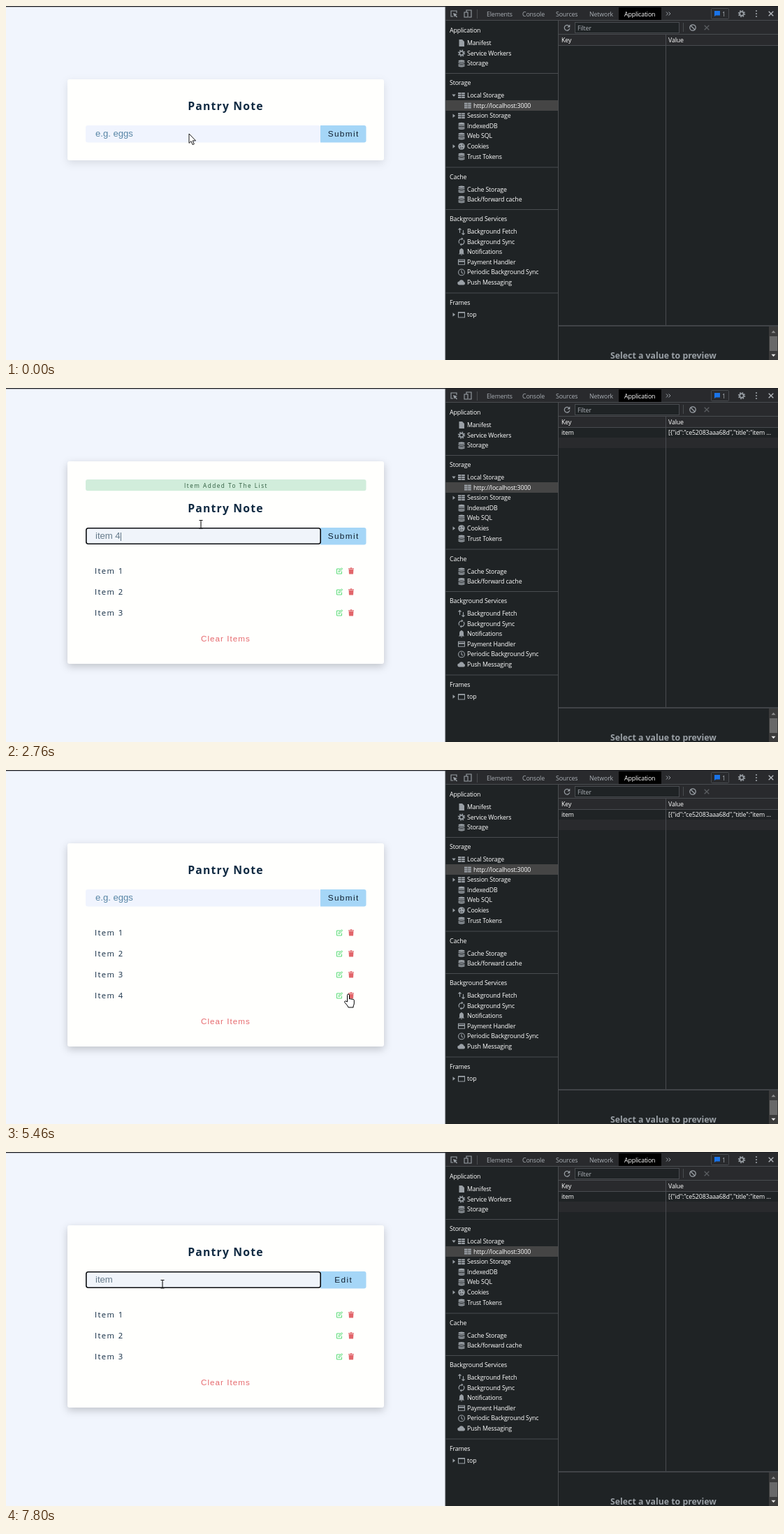
An HTML page for the animation above (8000 ms loop, 1105 by 507 pixels).

```html
<!DOCTYPE html>
<html lang="en">
<head>
<meta charset="utf-8">
<title>Shopping list with local storage</title>
<style>
html, body { margin: 0; width: 100%; height: 100%; overflow: hidden; background: #f1f5fd; }
svg { display: block; width: 100vw; height: 100vh; }
text { white-space: pre; font-family: "Open Sans", "Noto Sans", sans-serif; }
.ui { font-size: 8.8px; letter-spacing: -.14px; fill: #fff; }
.tab { fill: #a9aeb4; }
.preview { font-size: 12.3px; font-weight: 700; fill: #9aa0a6; }
.card { filter: drop-shadow(0 4px 6px rgba(0,0,0,.1)); }
.card.filled { filter: drop-shadow(0 4px 6px rgba(0,0,0,.2)); }
.title { font-size: 15.8px; font-weight: 700; letter-spacing: 1.17px; fill: #102a42; text-anchor: middle; }
.alert { font-size: 8.2px; letter-spacing: 1.5px; text-anchor: middle; }
.item { font-size: 11.2px; letter-spacing: 1.4px; }
.field, .button, .clear { font-family: "Liberation Sans", Arial, sans-serif; }
.field { font-size: 13.1px; }
.button { font-size: 11.8px; letter-spacing: 1.4px; text-anchor: middle; }
.clear { font-size: 11.7px; letter-spacing: 1.02px; fill: #e66a6e; text-anchor: middle; }
</style>
</head>
<body>
<svg viewBox="0 0 1105 507" preserveAspectRatio="none">
  <g id="tools"></g>
  <g id="storage"></g>
  <g id="app"></g>
</svg>
<script>
const LOOP = 8000, GRAY = '#9aa0a6', LINE = '#494c50', BAR = '#292a2d', DARK = '#1f2325';

const rect = (x, y, w, h, fill, extra = '') =>
  `<rect x="${x}" y="${y}" width="${w}" height="${h}" fill="${fill}" ${extra}/>`;
const text = (x, y, s, cls, extra = '') => `<text x="${x}" y="${y}" class="${cls}" ${extra}>${s}</text>`;
const solid = (x, y, d, fill = GRAY, extra = '') =>
  `<path transform="translate(${x} ${y})" d="${d}" fill="${fill}" ${extra}/>`;
const stroke = (x, y, d, color = GRAY, width = 1.1) =>
  solid(x, y, d, 'none', `stroke="${color}" stroke-width="${width}"`);
const ring = (x, y, r, width = 1.1, extra = '') =>
  `<circle cx="${x}" cy="${y}" r="${r}" fill="none" stroke="${GRAY}" stroke-width="${width}" ${extra}/>`;

// ---------- developer tools ----------
const gear = (x, y) => ring(x, y, 2.8, 1.8) + ring(x, y, 4.4, 1.5, 'stroke-dasharray="1.75 1.7"');
const icons = {
  file: (x, y) => solid(x, y, 'M-3.5-5H1L4-2V5h-7.5z'),
  gear,
  db: (x, y) => [-3.4, -.7, 2, 4].map((dy, i) =>
    solid(x, y + dy, i ? 'M-4.5-1.3q4.5 2 9 0v1.5q-4.5 2-9 0z' : 'M-4.5 0a4.5 1.6 0 0 1 9 0 4.5 1.6 0 0 1-9 0')).join(''),
  grid: (x, y) => [0, 1, 2, 3, 4, 5].map(i =>
    rect(x - 5 + i % 2 * 5.2, y - 4 + (i >> 1) * 2.9, 4.6, 2.2, GRAY)).join(''),
  cookie: (x, y) => `<circle cx="${x}" cy="${y}" r="4.8" fill="${GRAY}"/>` +
    [[-2, -1], [1, 2], [2, -2], [-1.5, 2.3]].map(([a, b]) => rect(x + a - .6, y + b - .6, 1.3, 1.3, DARK)).join(''),
  swap: (x, y) => stroke(x, y, 'M-2.5 2V-4.5M-4.5-2.5l2-2 2 2M2.5-2V4.5M.5 2.5l2 2 2-2'),
  sync: (x, y) => stroke(x, y, 'M-3 2.6A4 4 0 0 1 0-4M3-2.6A4 4 0 0 1 0 4', GRAY, 1.2) +
    solid(x, y, 'M0-6l2.5 2L0-2zM0 6l-2.5-2L0 2z'),
  bell: (x, y) => solid(x, y, 'M-4.2 3.2L-3 2V-1q0-3 2.3-3.4V-5.2H.7v.8Q3-4 3-1v3l1.2 1.2zM-1.2 4h2.4L0 5.3z'),
  card: (x, y) => stroke(x, y, 'M-4.5-3.5h9v7h-9z') + rect(x - 4.5, y - 2, 9, 2, GRAY),
  clock: (x, y) => ring(x, y, 4.4) + stroke(x, y, 'M0-2.8V.3L2 1.6'),
  cloud: (x, y) => solid(x, y, 'M-3 3.5a2.5 2.5 0 0 1-.4-5A3.6 3.6 0 0 1 3.4-1 2.3 2.3 0 0 1 3 3.5z'),
  frame: (x, y) => stroke(x, y, 'M-4.5-3.5h9v7.5h-9z') + rect(x - 4.5, y - 4, 9, 1.8, GRAY)
};
const PITCH = 14.6;
const sections = [
  ['Application', 35, 53, ['file Manifest', 'gear Service Workers', 'db Storage']],
  ['Storage', 110, 128, ['grid Local Storage', 'grid http://localhost:3000', 'grid Session Storage', 'db IndexedDB',
    'db Web SQL', 'cookie Cookies', 'db Trust Tokens']],
  ['Cache', 245, 262.5, ['db Cache Storage', 'db Back/forward cache']],
  ['Background Services', 305, 323, ['swap Background Fetch', 'sync Background Sync', 'bell Notifications',
    'card Payment Handler', 'clock Periodic Background Sync', 'cloud Push Messaging']],
  ['Frames', 425, 442, ['frame top']]
];

function sidebar() {
  let out = rect(629, 135, 161, 15, '#454545');
  for (const [heading, headY, firstY, entries] of sections) {
    out += text(635, headY + 3, heading, 'ui');
    entries.forEach((entry, i) => {
      const [kind, ...words] = entry.split(' '), label = words.join(' ');
      const y = firstY + i * PITCH, indent = label.startsWith('http') ? 9 : 0;
      out += icons[kind](652 + indent, y) + text(660 + indent, y + 3, label, 'ui');
      if (label === 'Local Storage') out += solid(641, y, 'M-2.7-1.5h5.4L0 2z');
      if (['Session Storage', 'Cookies', 'top'].includes(label)) out += solid(641, y, 'M-1.5-2.7v5.4L2 0z');
    });
  }
  return out + [96, 230.5, 291, 410.5].map(y => rect(629, y, 161, 1, LINE)).join('');
}

function toolbar() {
  const tabs = { Elements: 688, Console: 739, Sources: 787, Network: 835 };
  return rect(629, 1, 476, 19.5, BAR) + rect(629, 20, 476, 1, LINE) +
    stroke(641, 11, 'M4-1V-4h-8v8h3') + solid(641, 11, 'M-1-1l6 2-2.3 1L5 4.5 4 5.5 1.7 3 .8 5z') +
    stroke(661, 11, 'M-2-2V-5H5V5H1M-5-2H0V5h-5z') + rect(674, 5, 1, 13, LINE) +
    Object.entries(tabs).map(([name, x]) => text(x, 14.5, name, 'ui tab')).join('') +
    rect(877, 2, 61, 18, '#000') + text(885, 14.5, 'Application', 'ui') +
    stroke(948, 11, 'M-3-2.5L-.5 0-3 2.5M.5-2.5L3 0 .5 2.5', GRAY, 1) +
    rect(1009.5, 3.5, 25, 15, 'none', `stroke="${LINE}" rx="1"`) +
    solid(1018, 11, 'M-4-4h8v6.5h-6L-4 4z', '#1a73e8') + text(1025, 14.5, '1', 'ui tab') +
    gear(1053, 11) + [-4, 0, 4].map(d => `<circle cx="1074" cy="${11 + d}" r="1.1" fill="${GRAY}"/>`).join('') +
    stroke(1095, 11, 'M-3.3-3.3l6.6 6.6M3.3-3.3l-6.6 6.6', '#b4b8bd', 1.3);
}

function storagePanel() {
  return rect(791, 21, 314, 36, BAR) + rect(791, 40, 314, 1, LINE) + rect(791, 56, 314, 1, LINE) +
    rect(790, 21, 1, 486, LINE) +
    stroke(803, 31, 'M3-2.2A3.8 3.8 0 1 0 3.8 1', GRAY, 1.2) + solid(803, 31, 'M4.3-4.5V-.6H.4z') +
    rect(814.5, 23.5, 149, 15, DARK, `stroke="${LINE}"`) + text(818, 34.5, 'Filter', 'ui tab') +
    rect(969, 24, 1, 13, LINE) + ring(983, 31, 4.2, 1.3) + stroke(983, 31, 'M-3-3l6 6', GRAY, 1.3) +
    stroke(1003, 31, 'M-3.3-3.3l6.6 6.6M3.3-3.3l-6.6 6.6', '#5b5e62', 1.3) +
    text(795, 51.7, 'Key', 'ui') + text(948, 51.7, 'Value', 'ui') + rect(791, 457, 314, 2, '#404347') +
    text(865, 505, 'Select a value to preview', 'preview') +
    rect(1092, 459, 13, 48, '#3b3b3b') + rect(1093, 473, 11, 21, '#696969') +
    solid(1098.5, 466.5, 'M-3 1.7h6L0-1.7z', '#8b8b8b') + solid(1098.5, 500.5, 'M-3-1.7h6L0 1.7z', '#e6e6e6');
}

tools.innerHTML = rect(0, 0, 1105, 1.3, '#1b1c20') + rect(629, 1, 476, 506, DARK) +
  sidebar() + toolbar() + storagePanel() + rect(628.5, 1, 1, 506, LINE);

const storedRow = rect(791, 71, 314, 15, BAR) + text(795, 67, 'item', 'ui') +
  text(948, 67, '[{"id":"ce52083aaa68d","title":"item ...', 'ui');
const columnLine = rect(944, 41, 1, 416, LINE);

// ---------- timeline ----------
const itemCount = [[0, 0], [1330, 1], [2100, 2], [2430, 3], [2860, 4], [5570, 3]];
const notice = [[0, ''], [1330, 'Item Added To The List'], [4360, ''], [5570, 'Item Removed'], [7060, '']];
const focused = [[0, false], [200, true], [3200, false], [7480, true]];
// A trailing bar marks a visible caret.
const typed = [
  [0, ''], [460, 'i|'], [560, 'it|'], [640, 'ite|'], [740, 'item|'], [900, 'item |'], [1060, 'item 1|'], [1330, ''],
  [1460, 'i|'], [1530, 'it|'], [1590, 'ite|'], [1660, 'item|'], [1750, 'item |'], [1900, 'item 2|'], [2100, ''],
  [2200, 'i|'], [2250, 'it|'], [2300, 'item|'], [2360, 'item 3|'], [2430, ''],
  [2500, 'i|'], [2560, 'it|'], [2620, 'item|'], [2690, 'item |'], [2760, 'item 4|'], [2860, ''],
  [7200, 'item 3'], [7760, 'item |'], [7800, 'item ']
];
const pointer = [
  [60, 262, 183, 'arrow'], [100, 268, 187, 'beam'], [230, 279, 195, 'beam'], [3030, 279, 195, 'beam'],
  [3200, 300, 182, 'beam'], [3350, 320, 150, 'arrow'], [3500, 323, 133, 'arrow'], [3660, 323, 133, 'arrow'],
  [3830, 382, 157, 'arrow'], [4060, 382, 157, 'arrow'], [4200, 455, 202, 'hand'], [4360, 470, 215, 'arrow'],
  [4460, 476, 256, 'arrow'], [4600, 474, 278, 'arrow'], [4860, 476, 318, 'arrow'], [4900, 476, 318, 'arrow'],
  [5130, 482, 418, 'arrow'], [5300, 488, 400, 'arrow'], [5440, 490, 325, 'hand'], [5460, 490, 321, 'hand'],
  [5730, 490, 321, 'hand'], [5860, 488, 318, 'arrow'], [6000, 488, 318, 'arrow'], [6150, 485, 290, 'hand'],
  [6260, 484, 297, 'hand'], [6330, 482, 318, 'hand'], [6460, 480, 321, 'hand'], [6630, 480, 321, 'hand'],
  [6760, 478, 321, 'hand'], [7060, 478, 321, 'arrow'], [7150, 477, 293, 'hand'], [7200, 477, 292, 'arrow'],
  [7400, 280, 200, 'arrow'], [7430, 260, 194, 'beam'], [7560, 224, 189, 'beam'], [8000, 224, 189, 'beam']
];
const buttonHover = [[4200, 4370]];
const rowHover = [
  [[4370, 4440], [7270, 7310]], [[4440, 4600], [6090, 6300], [7230, 7270]],
  [[4600, 4760], [5570, 6090], [6300, 7060], [7110, 7230]], [[4760, 4960], [5455, 5570]]
];

const current = (steps, t) => steps.filter(s => s[0] <= t).pop()[1];
const clamp = v => Math.max(0, Math.min(1, v));
const hoverLevel = (spans, t) =>
  clamp(spans.reduce((sum, [a, b]) => sum + clamp((t - a) / 300) - clamp((t - b) / 300), 0));
const mix = (a, b, k) => `rgb(${a.map((v, i) => Math.round(v + (b[i] - v) * k))})`;

// ---------- list app ----------
const cursors = {
  arrow: (x, y) => solid(x, y, 'M0 0V13.4l3-2.8 2.1 5 2.2-.9-2.1-4.8H9.5z', '#fff', 'stroke="#000" stroke-width=".9"'),
  beam: (x, y) => stroke(x, y, 'M-2.5-5.5H-.5L0-5 .5-5.5h2M0-5V5.5M-2.5 6H-.5L0 5.5 .5 6h2', '#111', 1.1),
  hand: (x, y) => solid(x, y,
    'M-1.5 11V1.5a1.5 1.5 0 0 1 3 0V7q1.3-1 2.3.3 1.4-1 2.3.4 1.8-.8 2.2 1V13q0 2-1.2 4v2H0q-.6-2-2.5-4L-5.5 11.5q0-2 2-1.5z',
    '#fff', 'stroke="#000" stroke-width="1"')
};

function cursor(t) {
  const next = pointer.findIndex(p => p[0] > t);
  const b = pointer[next], a = pointer[Math.max(0, next - 1)];
  const k = a === b ? 0 : (t - a[0]) / (b[0] - a[0]);
  return cursors[a[3]](a[1] + (b[1] - a[1]) * k, a[2] + (b[2] - a[2]) * k);
}

function alertBar(message) {
  const added = message.includes('Added');
  return rect(114, 131, 401.5, 16.3, added ? '#d1eddb' : '#f8d7dc', 'rx="3"') +
    text(315, 142.5, message, 'alert', `fill="${added ? '#2c5a3c' : '#6b2a33'}"`);
}

function form(t, y) {
  const value = current(typed, t), hover = hoverLevel(buttonHover, t);
  const content = value.replace('|', '<tspan dx="-1">|</tspan>') || 'e.g. eggs';
  const input = current(focused, t)
    ? rect(114.8, y + .8, 335.4, 22.4, '#f0f4fa', 'rx="3" stroke="#0b0d10" stroke-width="1.6"')
    : rect(114, y, 336, 24.4, '#f0f4fe', 'rx="3"');
  const caption = t >= 7200 ? 'Edit' : 'Submit';
  return solid(450, y, 'M0 0H62.5q3 0 3 3V21.4q0 3-3 3H0z', mix([165, 214, 247], [73, 166, 233], hover)) + input +
    text(128, y + 16.3, content, 'field', `fill="${value ? '#64798a' : '#5785a5'}"`) +
    text(483.2, y + 16.2, caption, 'button', `fill="${mix([16, 30, 46], [255, 255, 255], hover)}"`);
}

function row(i, t, shift) {
  const y = 233 + 30 * i + shift, level = hoverLevel(rowHover[i], t);
  return rect(114, y - 12, 401, 24, '#f1f5fa', `rx="3" opacity="${level}"`) +
    text(127, y + 4.2, `Item ${i + 1}`, 'item', `fill="${mix([16, 42, 66], [97, 125, 152], level)}"`) +
    stroke(477, y, 'M1.5-3H-3.5V4H3.5V.5M-1 1.5L-.6-.3 3.6-4.2 4.6-3.2 .6 1.1z', '#5bdc78', 1) +
    solid(494, y, 'M-4-3.8h2.4l.7-.9h1.8l.7.9H4v1.2h-8zM-3.4-1.9h6.8L3 4.6h-6z', '#e2666b');
}

function draw(t) {
  const count = current(itemCount, t), message = current(notice, t), shift = message ? 29 : 0;
  const bottom = (count ? 276 + 30 * count : 221) + shift;
  let out = rect(88, 105, 453, bottom - 105, '#fffffd', `rx="3" class="card ${count ? 'filled' : ''}"`);
  if (message) out += alertBar(message);
  out += text(314.5, 148.5 + shift, 'Pantry Note', 'title') + form(t, 171 + shift);
  for (let i = 0; i < count; i++) out += row(i, t, shift);
  if (count) out += text(314.5, 244.3 + 30 * count + shift, 'Clear Items', 'clear');
  app.innerHTML = out + cursor(t);
  storage.innerHTML = (count ? storedRow : '') + columnLine;
}

function tick() {
  draw(performance.now() % LOOP);
  requestAnimationFrame(tick);
}
tick();
</script>
</body>
</html>
```
